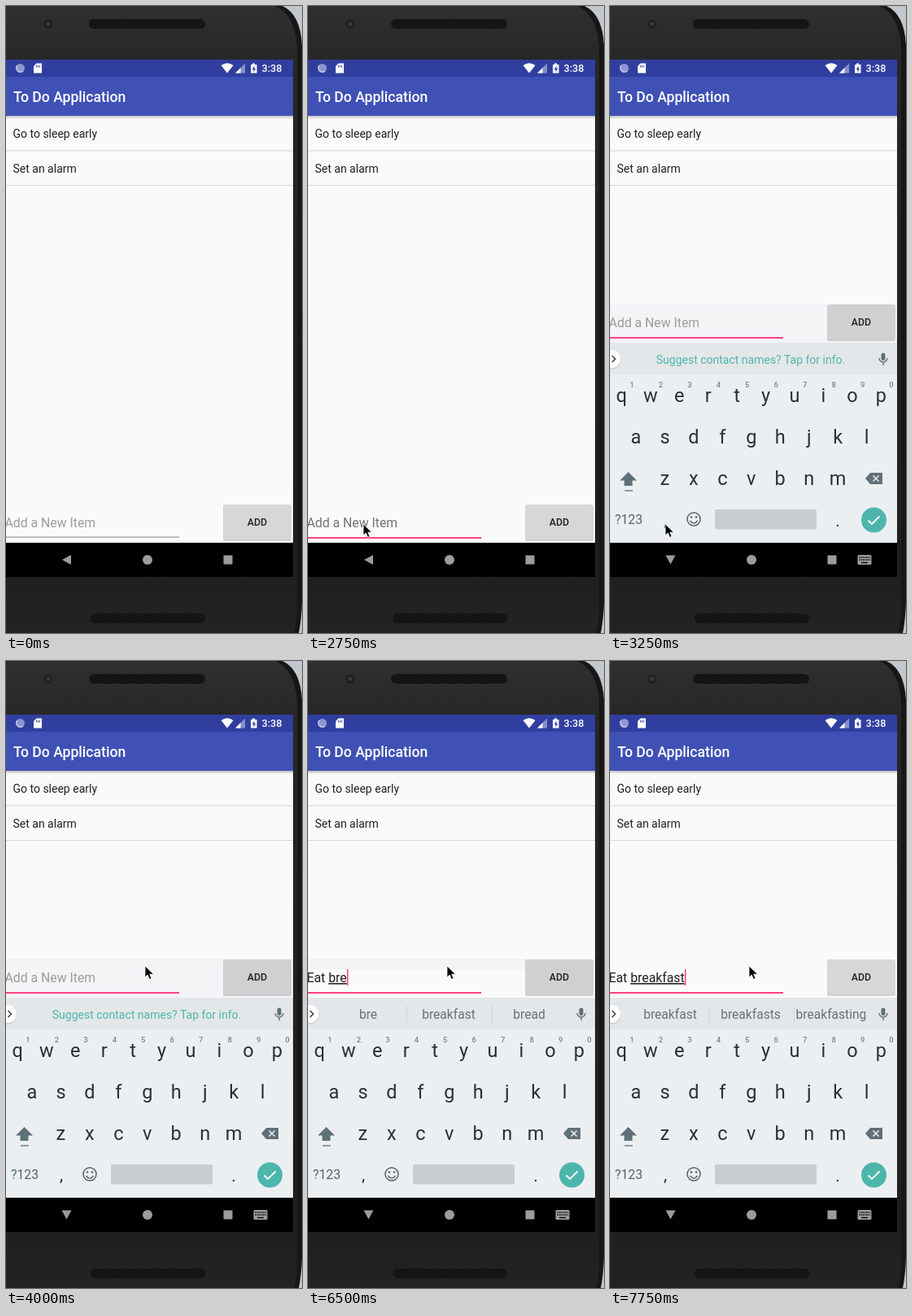
An HTML page for the animation above (8000 ms loop, 364 px wide and 771 px high).

```html
<!DOCTYPE html>
<html lang="en">
<head>
<meta charset="utf-8">
<title>To Do</title>
<style>
html, body { margin: 0; width: 100%; height: 100%; overflow: hidden; background: #222; }
svg { display: block; width: 364px; height: 771px; font-family: Roboto, sans-serif; }
text { white-space: pre; }
.mid { text-anchor: middle; }
.med { font-weight: 500; }
</style>
</head>
<body>
<svg viewBox="0 0 364 771">
  <defs>
    <linearGradient id="shell" x2="0" y2="1">
      <stop offset="0" stop-color="#2f2f2f"/><stop offset=".09" stop-color="#272727"/>
      <stop offset=".9" stop-color="#1f1f1f"/><stop offset="1" stop-color="#232323"/>
    </linearGradient>
    <linearGradient id="shade" x2="0" y2="1">
      <stop offset="0" stop-opacity=".25"/><stop offset="1" stop-opacity="0"/>
    </linearGradient>
    <pattern id="mesh" width="4" height="4" patternUnits="userSpaceOnUse">
      <rect width="4" height="4" fill="#0f0f0f"/>
      <circle cx="1" cy="1" r=".7" fill="#2c2c2c"/><circle cx="3" cy="3" r=".7" fill="#2c2c2c"/>
    </pattern>
    <clipPath id="screen"><rect y="66" width="353" height="594"/></clipPath>
  </defs>

  <!-- phone -->
  <rect width="364" height="771" fill="#c3c7ce"/>
  <path d="M0 0H340Q362 10 364 48V735Q363 757 360 771H0Z" fill="#171717"/>
  <path d="M0 0H331Q355 10 358 50V735Q358 757 354 771H0Z" fill="url(#shell)"/>
  <circle cx="52" cy="22" r="5.5" fill="#202020"/><circle cx="52" cy="22" r="2.5" fill="#3a3a3a"/>
  <rect x="102" y="16" width="143" height="12" rx="6" fill="url(#mesh)"/>
  <rect x="104" y="747" width="141" height="12" rx="6" fill="url(#mesh)"/>

  <!-- app -->
  <rect y="66" width="353" height="594" fill="#fafafa"/>
  <rect y="66" width="353" height="21" fill="#303f9f"/>
  <rect y="87" width="353" height="48" fill="#3f51b5"/>
  <rect y="135" width="353" height="4" fill="url(#shade)"/>
  <circle cx="17.5" cy="76.5" r="5.5" fill="#8c96cf"/>
  <path d="M14 73a5 5 0 0 0 7 7" fill="none" stroke="#c5cae9" stroke-width="1.3"/>
  <path d="M37.5 70.5H44V82.500H34V74Z" fill="#fff"/>
  <path d="M37.500 73v2.500M39.500 73v2.500M41.500 73v2.500" stroke="#303f9f"/>
  <path d="M264.500 73Q272 67.500 279.500 73L272 82.500Z" fill="#fff"/>
  <path d="M294 70.500V82.500H282Z" fill="#8790c8"/><path d="M288.500 76V82.500H282Z" fill="#fff"/>
  <path d="M303 70.500h3v1.500h2.500v10.500h-7.500v-10.500h2Z" fill="#fff"/>
  <path d="M305.500 73.500L302.800 78H304.500V81.500L307 77H305.500Z" fill="#303f9f"/>
  <text x="314.500" y="81" font-size="12.600" class="med" fill="#fff">3:38</text>
  <text x="9" y="118" font-size="17.600" class="med" fill="#fff">To Do Application</text>
  <g font-size="14" fill="#212121">
    <text x="8.500" y="161.500">Go to sleep early</text>
    <text x="8.500" y="204.500">Set an alarm</text>
  </g>
  <path d="M0 178H353M0 220.500H353" stroke="#d6d6d6"/>
  <rect id="tint" y="366" width="353" fill="#f3f4f6"/>

  <!-- input row -->
  <g id="row">
    <text id="hint" x="-1.500" y="641" font-size="15.800">Add a New Item</text>
    <text id="entry" x="-1.500" y="641" font-size="15.800" fill="#212121"><tspan id="done"></tspan><tspan id="word" text-decoration="underline"></tspan></text>
    <rect id="caret" y="625" width="1.600" height="20" fill="#ff4081"/>
    <rect id="line" width="213"/>
    <rect x="267" y="614" width="84" height="44" rx="2" fill="#000" opacity=".16"/>
    <rect id="button" x="267.500" y="613" width="83" height="43" rx="2"/>
    <text x="309" y="639" font-size="12.300" class="mid med" fill="#212121">ADD</text>
  </g>

  <!-- keyboard -->
  <g clip-path="url(#screen)"><g id="keyboard">
    <rect y="414" width="353" height="246" fill="#eceff1"/>
    <rect y="414" width="353" height="39" fill="#e4e7e9"/>
    <circle cx="2" cy="435" r="11.500" fill="#000" opacity=".1"/>
    <circle cx="2" cy="434" r="11" fill="#fff"/>
    <path d="M2.500 430L6.500 434L2.500 438" fill="none" stroke="#37474f" stroke-width="1.600"/>
    <text id="tip" x="173" y="439.500" font-size="14" class="mid" fill="#4db6ac">Suggest contact names? Tap for info.</text>
    <g id="words" font-size="15.600" class="mid" fill="#66727a">
      <path d="M121.500 424V445M226.500 424V445" stroke="#cfd4d7"/>
      <text x="74" y="440"></text><text x="173" y="440"></text><text x="272" y="440"></text>
    </g>
    <rect x="333.500" y="426.500" width="5" height="9.500" rx="2.500" fill="#607079"/>
    <path d="M331 433a5 5 0 0 0 10 0M336 438V442" fill="none" stroke="#607079" stroke-width="1.400"/>
    <g id="keys" class="mid" fill="#263238"></g>
    <path d="M22.500 573L33 583.500H27.500V590H17.500V583.500H12Z" fill="#607079"/>
    <path d="M18 596H28" stroke="#607079" stroke-width="1.300"/>
    <path d="M314 581L320 574H335V588H320Z" fill="#607079"/>
    <path d="M323.500 577.500L330.500 584.500M330.500 577.500L323.500 584.500" stroke="#eceff1" stroke-width="1.500"/>
    <text x="23" y="637" font-size="15.800" class="mid" fill="#55636b">?123</text>
    <g fill="none" stroke="#55636b" stroke-width="1.500">
      <circle cx="103" cy="631" r="8"/><path d="M98.500 633Q103 639 107.500 633"/>
    </g>
    <circle cx="100" cy="628.500" r="1.300" fill="#55636b"/><circle cx="106" cy="628.500" r="1.300" fill="#55636b"/>
    <rect x="129" y="619" width="125" height="24.500" rx="2" fill="#c8cdd0"/>
    <circle cx="324.500" cy="632" r="15.500" fill="#4db6ac"/>
    <path d="M317.500 632.500L322 637L331.500 627.500" fill="none" stroke="#fff" stroke-width="1.900"/>
  </g></g>

  <!-- navigation -->
  <rect y="660" width="353" height="42" fill="#000"/>
  <g fill="#9c9c9c">
    <path id="back" d="M69 681L80 675V687Z"/>
    <circle cx="174" cy="681" r="6"/>
    <rect x="267.500" y="675.500" width="11" height="11"/>
    <g id="picker">
      <rect x="304.500" y="675" width="17" height="12" rx="1.500"/>
      <path d="M306.500 678H320M306.500 681H320" stroke="#000" stroke-width="1.500" stroke-dasharray="1.500 1"/>
      <path d="M309 684.500H317" stroke="#000" stroke-width="1.300"/>
    </g>
  </g>
  <path id="pointer" d="M0 0V14L3.200 11L5.500 16.400L8 15.300L5.700 10.200H10.500Z" stroke="#fff" stroke-width=".8"/>
</svg>
<script>
const LOOP = 8000, STEP = 250;
const $ = id => document.getElementById(id);
const set = (id, attrs) => { for (const k in attrs) $(id).setAttribute(k, attrs[k]); };
const show = (id, on) => set(id, { visibility: on ? 'visible' : 'hidden' });

function addKey(label, x, y, size, extra = '') {
  $('keys').insertAdjacentHTML('beforeend',
    `<text x="${x}" y="${y}" font-size="${size}" ${extra}>${label}</text>`);
}
const PITCH = 35.45;
[['qwertyuiop', 14.3, 487], ['asdfghjkl', 32, 538], ['zxcvbnm', 67.4, 588.5]].forEach(([row, x, y]) =>
  [...row].forEach((c, i) => addKey(c, x + i * PITCH, y, 23.5)));
[...'1234567890'].forEach((c, i) => addKey(c, 27 + i * PITCH, 468.5, 9.5, 'class="med" fill="#78858c"'));
addKey(',', 68, 638.5, 21);
addKey('.', 280, 640, 21);

// time, x, y
const moves = [
  [500, 246, 368], [750, 150, 552], [1000, 127, 584.5], [1250, 122, 593], [1500, 112, 612],
  [1750, 97, 630], [2000, 96, 637], [2500, 72, 638], [2750, 68, 637],
  [3500, 134, 496], [3750, 141, 477], [4000, 171, 375]
];
// time, finished text, word being typed, suggestions
const typing = [
  [5500, '', 'E'],
  [5750, '', 'Eat'],
  [6000, 'Eat ', 'b', ['b', 'be', 'breakfast']],
  [6250, 'Eat ', 'br', ['br', 'bro', 'bring']],
  [6500, 'Eat ', 'bre', ['bre', 'breakfast', 'bread']],
  [6750, 'Eat ', 'brea', ['brea', 'bread', 'breaking']],
  [7250, 'Eat ', 'break', ['break', 'breakfast', 'breaks']],
  [7500, 'Eat ', 'breakfa', ['breakfa', 'breakfast', 'breakfasts']],
  [7750, 'Eat ', 'breakfast', ['breakfast', 'breakfasts', 'breakfasting']]
];
const latest = (list, t) => list.filter(e => e[0] <= t).pop();

function draw(t) {
  const focus = t >= 2750, open = t >= 3000, opening = t === 3000;

  const at = latest(moves, t);
  show('pointer', at);
  if (at) set('pointer', { transform: `translate(${at[1]} ${at[2]})` });

  set('row', { transform: `translate(0 ${open ? -246 : 0})` });
  set('line', { y: focus ? 653 : 652.5, height: focus ? 2 : 1.2, fill: focus ? '#ff4081' : '#999' });
  set('hint', { fill: t === 2750 ? '#737373' : '#9c9c9c' });
  const tinted = open && t < 7500;
  set('tint', { height: !tinted ? 0 : t < 6000 ? 48 : 13 });
  set('button', { fill: tinted ? '#cfd0d0' : '#d6d7d7' });

  show('keyboard', open);
  set('keyboard', { opacity: opening ? 0.6 : 1, transform: `translate(0 ${opening ? 18 : 0})` });
  show('picker', open);
  set('back', { transform: opening ? 'rotate(-60 74.5 681)' : open ? 'rotate(-90 74.5 681)' : '' });

  const [, done, word, options] = latest(typing, t) || [0, '', ''];
  show('hint', !word);
  show('caret', word);
  $('done').textContent = done;
  $('word').textContent = word;
  if (word) set('caret', { x: $('entry').getComputedTextLength() - 1.3 });
  show('tip', open && !options);
  show('words', options);
  if (options) $('words').querySelectorAll('text').forEach((e, i) => e.textContent = options[i]);
}

const start = performance.now();
let last = -1;
function tick() {
  const t = Math.floor((performance.now() - start) % LOOP / STEP) * STEP;
  if (t !== last) draw(last = t);
  requestAnimationFrame(tick);
}
tick();
</script>
</body>
</html>
```
